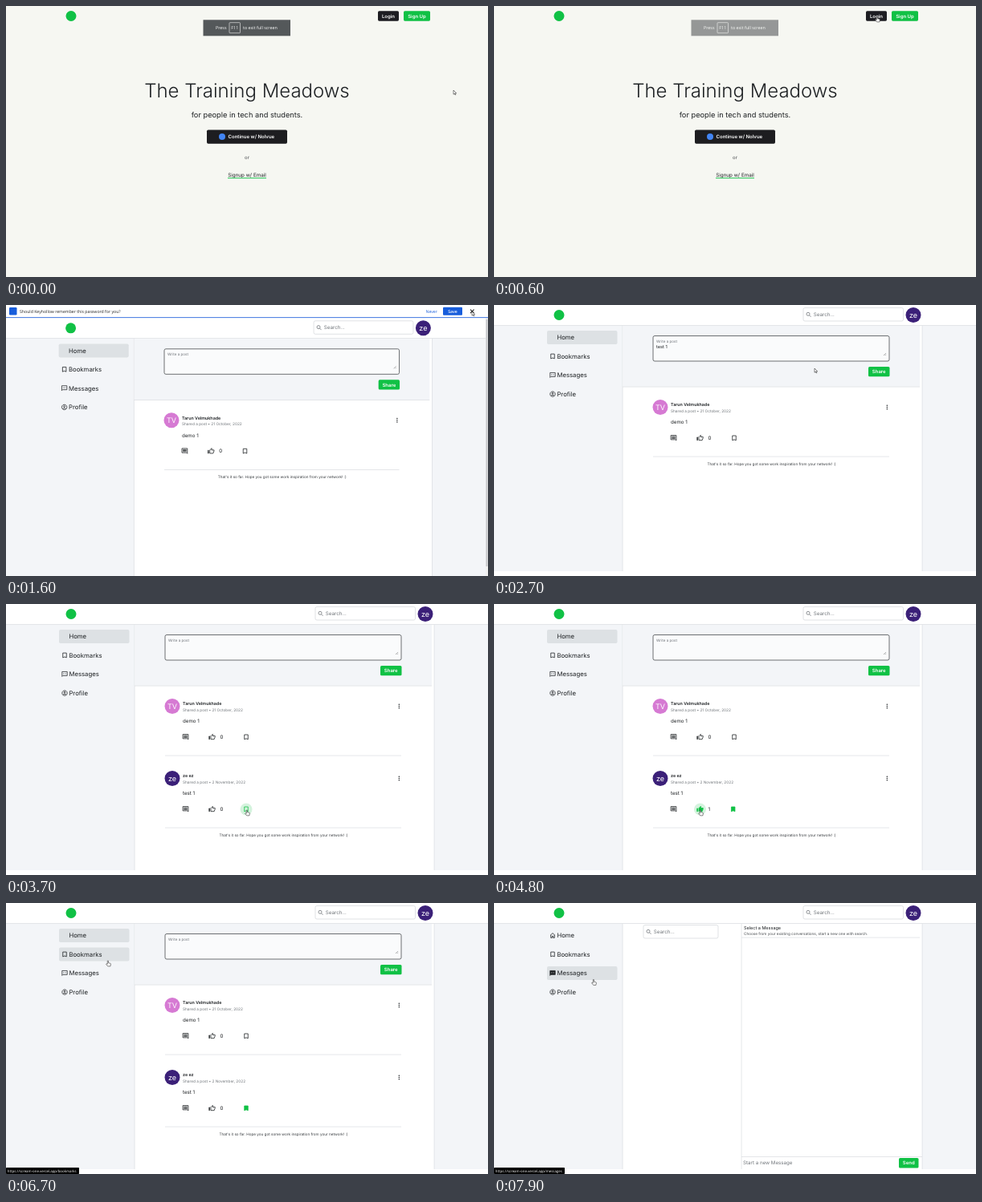
These frames come from a looping animation (600x338 px, 8 s). An HTML page:

```html
<!DOCTYPE html>
<html lang="en">
<head>
<meta charset="utf-8">
<title>Study network demo</title>
<style>
  html, body { margin: 0; width: 100%; height: 100%; overflow: hidden; background: #fff; }
  svg { display: block; width: 600px; height: 338px; }
  text { font-family: Inter, "Liberation Sans", sans-serif; text-rendering: geometricPrecision; }
  .ui { font-family: "Open Sans", "Noto Sans", sans-serif; }
</style>
</head>
<body>
<svg viewBox="0 0 600 338"><g id="page"></g><g id="pointer"></g></svg>
<script>
const LOOP = 8000;
const INK = '#1d2023', GREEN = '#10c145', GREY = '#70757a', LINE = '#d9dce0',
      SIDE = '#f3f5f8', ACTIVE = '#dde1e4', PURPLE = '#3b2078', PINK = '#d67ad3';
const page = document.getElementById('page');
const pointer = document.getElementById('pointer');

// Horizontal layout scale: slightly under 1 while a scrollbar takes room.
let k = 1;

const rect = (x, y, w, h, fill, r = 0, extra = '') =>
  `<rect x="${x * k}" y="${y}" width="${w * k}" height="${h}" rx="${r}" fill="${fill}" ${extra}/>`;
const box = (x, y, w, h, stroke, fill = '#fff', sw = .7) =>
  rect(x, y, w, h, fill, 2, `stroke="${stroke}" stroke-width="${sw}"`);
const hline = (x, y, w, fill = LINE) => rect(x, y - .3, w, .7, fill);
const vline = (x, y, h) => rect(x - .3, y, .7, h, LINE);
const disc = (x, y, r, fill) => `<circle cx="${x * k}" cy="${y}" r="${r}" fill="${fill}"/>`;
const text = (x, y, size, str, fill = INK, extra = '') =>
  `<text x="${x * k}" y="${y}" font-size="${size}" fill="${fill}" ${extra}>${str}</text>`;
const MID = 'text-anchor="middle"', BOLD = 'font-weight="600"', UI = 'class="ui"';
const button = (x, y, w, h, label, fill) =>
  rect(x, y, w, h, fill, 1.6) + text(x + w / 2, y + h / 2 + 2.2, 6, label, '#fff', MID + ' ' + BOLD);
const avatar = (x, y, name, fill) =>
  disc(x, y, 9.5, fill) + text(x, y + 3.2, 9, name, '#fff', MID);

// Icons live in a 24-unit square.
const SHAPES = {
  home: 'M4 11.5L12 4l8 7.5M6 10.5V19.5H10V14h4v5.5h4v-9',
  homeFull: 'M12 3L2 12h3v8h5v-6h4v6h5v-8h3z',
  mark: 'M6 4h12v15.5l-6-2.6-6 2.6z',
  chat: 'M3 3h18v14H6l-3 3z',
  chatDots: 'M7 10h2m2 0h2m2 0h2',
  comment: 'M3 3h18v17l-3-3H3zM6 7h12M6 10h12M6 13h12',
  like: 'M8 9.3L14 3l1 1-1.2 5H22v3l-3 8H8zM2 10h2v10H2z',
  user: 'M12 3a9 9 0 1 0 .01 0M12 7.5a2.5 2.5 0 1 0 .01 0M6 18.5c3-4 9-4 12 0'
};
const icon = (name, x, y, color = INK, full = false, size = 9) => {
  const s = size / 24;
  return `<path d="${SHAPES[name]}" transform="translate(${x * k - size / 2} ${y - size / 2}) scale(${s})"
    fill="${full ? color : 'none'}" stroke="${color}" stroke-width="${name === 'homeFull' ? 0 : 2.1}"/>`;
};

function search(x, y, w) {
  return box(x, y, w, 16.5, '#d3d6da') +
    `<g fill="none" stroke="${GREY}" stroke-width=".8"><circle cx="${(x + 6) * k}" cy="${y + 7.8}" r="2"/>` +
    `<path d="M${(x + 6) * k + 1.5} ${y + 9.3}l2 2"/></g>` +
    text(x + 12.7, y + 10.5, 6.25, 'Search...', GREY);
}

function post(y, who, initials, color, date, body, p) {
  const shade = (hot, on) => hot || on ? GREEN : INK;
  const markX = p.liked ? 297.7 : 299;
  let dots = '';
  for (const d of [-2.2, 0, 2.2]) dots += disc(489.3, y + d, .75, INK);
  return avatar(207, y, initials, color) + dots +
    text(220, y - 1.2, 5.35, who, INK, BOLD) +
    text(220, y + 6.1, 4.75, 'Shared a post • ' + date, GREY) +
    text(220, y + 20.8, 6.2, body) +
    (p.hotLike ? disc(256.5, y + 38.5, 7.5, '#d5f3de') : '') +
    (p.hotMark ? disc(299, y + 38.5, 7.5, '#d5f3de') : '') +
    icon('comment', 223.5, y + 38.5) +
    icon('like', 256.5, y + 38.2, shade(p.hotLike, p.liked), p.liked) +
    text(266.5, y + 40.7, 6.2, p.liked ? 1 : 0) +
    icon('mark', markX, y + 38.5, shade(p.hotMark, p.saved), p.saved) +
    hline(198, y + 61.5, 294);
}

const firstPost = p => post(127.5, 'Tarun Velmukhade', 'TV', PINK, '21 October, 2022', 'demo 1', p);
const secondPost = (y, p) => post(y, 'ze ez', 'ze', PURPLE, '2 November, 2022', 'test 1', p);
const ending = y => text(345.5, y, 4.64,
  "That's it so far. Hope you got some work inspiration from your network! :)", '#33373b', MID);

function nav(active, hover) {
  return ['Home', 'Bookmarks', 'Messages', 'Profile'].map((label, i) => {
    const y = 40.6 + i * 23.5, on = i === active;
    const glyph = i === 0 ? icon(on ? 'homeFull' : 'home', 73, y)
      : i === 1 ? icon('mark', 73, y, INK, on)
      : i === 2 ? icon('chat', 73, y, INK, on, 8.5) + icon('chatDots', 73, y, on ? '#fff' : INK, false, 8.5)
      : icon('user', 73, y, INK, false, 8.5);
    return (on || i === hover ? rect(66, y - 8.5, 87.5, 17, ACTIVE, 1.8) : '') +
      glyph + text(78.4, y + 2.8, 7.75, label);
  }).join('');
}

function feed(s) {
  return rect(160.5, 26, 369.5, 76, SIDE) + hline(160, 102, 370) +
    box(198, 38.5, 294, 31.5, '#4a4d50', '#fafbfc', .8) +
    text(202, 46.6, 4.6, 'Write a post', GREY) + text(202, 54, 5.6, s.draft) +
    `<path d="M${485 * k} 63l3-3m-1.2 3l1.2-1.2" stroke="#666" stroke-width=".5"/>` +
    button(466, 77, 26.5, 12.3, 'Share', GREEN) +
    firstPost({ hotLike: s.hot === 'like1' }) +
    (s.posted ? secondPost(217.5, s.second) : '') + ending(s.posted ? 290.2 : 200.2);
}

function messages() {
  return search(186, 27.5, 93) + vline(308, 26, 306) +
    text(311, 33, 5.5, 'Select a Message') +
    text(311, 39.9, 4.65, 'Choose from your existing conversations, start a new one with search.', '#44484c') +
    hline(308, 43, 222) + hline(308, 316.5, 225) +
    text(310, 326.4, 6.2, 'Start a new Message', GREY) +
    button(504, 318, 24.5, 12.5, 'Send', GREEN);
}

function app(s) {
  k = s.bar ? .995 : 1;
  const low = s.bar ? 338 : 332;
  const body = rect(0, 25.5, 600, low - 25.5, SIDE) + rect(160, 25.5, 373, low - 25.5, '#fff') +
    vline(160, 25.5, low - 25.5) + vline(533, 25.5, low - 25.5) +
    rect(0, 0, 600, 25.5, '#fff') + hline(0, 25.3, 600) +
    disc(81, 12.5, 6.5, GREEN) + search(385, 3.5, 124.5) + avatar(522, 12.5, 'ze', PURPLE) +
    nav(s.view, s.hover) +
    (s.view === 0 ? feed(s) : s.view === 1 ? secondPost(47.5, s.second) : messages());
  k = 1;
  return rect(0, 0, 600, 338, '#fff') +
    `<g transform="translate(0 ${s.bar ? 16.3 : 0})">${body}</g>` + (s.bar ? passwordBar() : '');
}

function passwordBar() {
  return rect(597, 16, 3, 322, '#f1f1f1') + rect(597.5, 18, 2, 308, '#c4c6c9') +
    rect(0, 0, 600, 16, '#fff') + rect(0, 15.2, 600, .9, '#2d69dc') +
    rect(4, 3, 9.5, 9.5, '#175ddc', 1.2) +
    text(17, 9.6, 5.2, 'Should Keyhollow remember this password for you?', '#222', UI) +
    text(522.5, 9.6, 5.2, 'Never', '#175ddc', UI) +
    rect(544, 2.7, 24, 10, '#175ddc', 1) +
    text(556, 9.6, 5.2, 'Save', '#fff', 'class="ui" ' + MID + ' ' + BOLD) +
    '<path d="M578 5.6l4.6 4.6m0-4.6l-4.6 4.6" stroke="#222" stroke-width="1.1"/>';
}

function landing(hint) {
  return rect(0, 0, 600, 338, '#f6f7f2') + disc(81, 12.5, 6.5, GREEN) +
    button(463, 6.2, 26, 12.5, 'Login', '#1d1d22') + button(495, 6.2, 33, 12.5, 'Sign Up', GREEN) +
    text(300, 114, 24, 'The Training Meadows', INK, MID + ' font-weight="300"') +
    text(300, 139.2, 9.25, 'for people in tech and students.', INK, MID) +
    rect(250, 154.5, 100, 17.3, '#1d1d20', 1.8) + disc(269, 163, 4, '#4285f4') +
    text(276.5, 165.3, 6.05, 'Continue w/ Nolvue', '#fff', BOLD) +
    text(300, 191, 6, 'or', '#44484c', MID) +
    text(300, 213, 6.3, 'Signup w/ Email', INK, MID) + rect(276, 214.2, 48, .9, GREEN) +
    `<g opacity="${hint}">` + rect(245.5, 17.3, 108.5, 20, '#54585a') +
    text(261, 29.3, 5.4, 'Press', '#fff', UI) +
    rect(278, 20.7, 13.5, 13, 'none', .8, 'stroke="#ddd" stroke-width=".7"') +
    text(284.8, 29.3, 5.4, 'F11', '#fff', 'class="ui" ' + MID) +
    text(295, 29.3, 5.4, 'to exit full screen', '#fff', UI) + '</g>';
}

const status = (w, str, bg, fg) => rect(0, 330, w, 8, bg, .8) + text(1.8, 335.7, 4.4, str, fg, UI);

// Pointer stops: time, x, y
const PATH = [
  [0, 557, 105], [100, 557, 105], [400, 477, 13], [600, 477, 13], [950, 517, 109], [1200, 517, 109],
  [1500, 580, 8], [1620, 580, 8], [1850, 500, 34], [2050, 300, 55], [2550, 300, 55], [2700, 399, 79],
  [2900, 478, 83], [3100, 478, 83], [3600, 300, 257], [4100, 300, 257], [4400, 257, 257],
  [4900, 257, 257], [5300, 280, 225], [5500, 280, 225], [5800, 257, 167], [5950, 257, 167],
  [6120, 257, 257], [6300, 257, 257], [6600, 127, 72], [7250, 127, 72], [7600, 124, 95.5], [8000, 124, 95.5]
];

function pointerAt(t) {
  const i = Math.max(1, PATH.findIndex(p => p[0] > t));
  const [t0, x0, y0] = PATH[i - 1], [t1, x1, y1] = PATH[i];
  const u = (t - t0) / (t1 - t0), e = u * u * (3 - 2 * u);
  return [x0 + (x1 - x0) * e, y0 + (y1 - y0) * e];
}

function draw(t) {
  const [x, y] = pointerAt(t);
  const within = (l, top, w, h) => x >= l && x <= l + w && y >= top && y <= top + h;
  let html, hand;
  if (t < 1000) {
    hand = within(463, 6, 26, 13);
    html = landing(Math.min(1, Math.max(0, (750 - t) / 250)));
  } else {
    const view = t < 6950 ? 0 : t < 7750 ? 1 : 2;
    const bar = t < 1620;
    const hover = bar ? -1 : [0, 1, 2, 3].findIndex(i => within(66, 32 + i * 23.5, 87.5, 17.2));
    const hot = view || bar ? '' : within(249, 158, 15, 16) ? 'like1'
      : t > 3100 && within(249, 248, 15, 16) ? 'like2'
      : t > 3100 && within(291, 248, 15, 16) ? 'mark2' : '';
    const second = {
      liked: t >= 4600 && t < 6200, saved: t >= 3900,
      hotLike: hot === 'like2', hotMark: hot === 'mark2'
    };
    const typed = Math.floor((t - 2080) / 70);
    const draft = t < 3080 ? 'test 1'.slice(0, Math.max(0, Math.min(6, typed))) : '';
    html = app({ view, bar, hover, hot, second, draft, posted: t >= 3080 });
    if (hover === 1 || hover === 2)
      html += status(hover === 1 ? 91 : 88,
        'https://scream-one.vercel.app/' + ['bookmarks', 'messages'][hover - 1], '#000', '#fff');
    hand = hover >= 0 || hot || (!view && within(466, 77, 27, 13));
  }
  if (t >= 900 && t < 1400)
    html += status(199, 'Waiting for identitytoolkit.googleapis.com...', '#a3a3a3', '#f4f4f4');
  if (html !== draw.last) page.innerHTML = draw.last = html;
  const shape = hand
    ? 'M-.7.5a.6.6 0 0 1 1.2 0V2.7l2.3.6a.8.8 0 0 1 .6.9l-.5 2.7H-.3l-2.1-2.6.6-.7 1.1.7z'
    : 'M0 0v5.2l1.3-1.1.8 1.8.8-.3-.8-1.8h1.6z';
  pointer.innerHTML = `<path d="${shape}" transform="translate(${x} ${y})" fill="#fff" stroke="#222" stroke-width=".55"/>`;
}

const start = performance.now();
function tick() {
  draw((performance.now() - start) % LOOP);
  requestAnimationFrame(tick);
}
tick();
</script>
</body>
</html>
```
